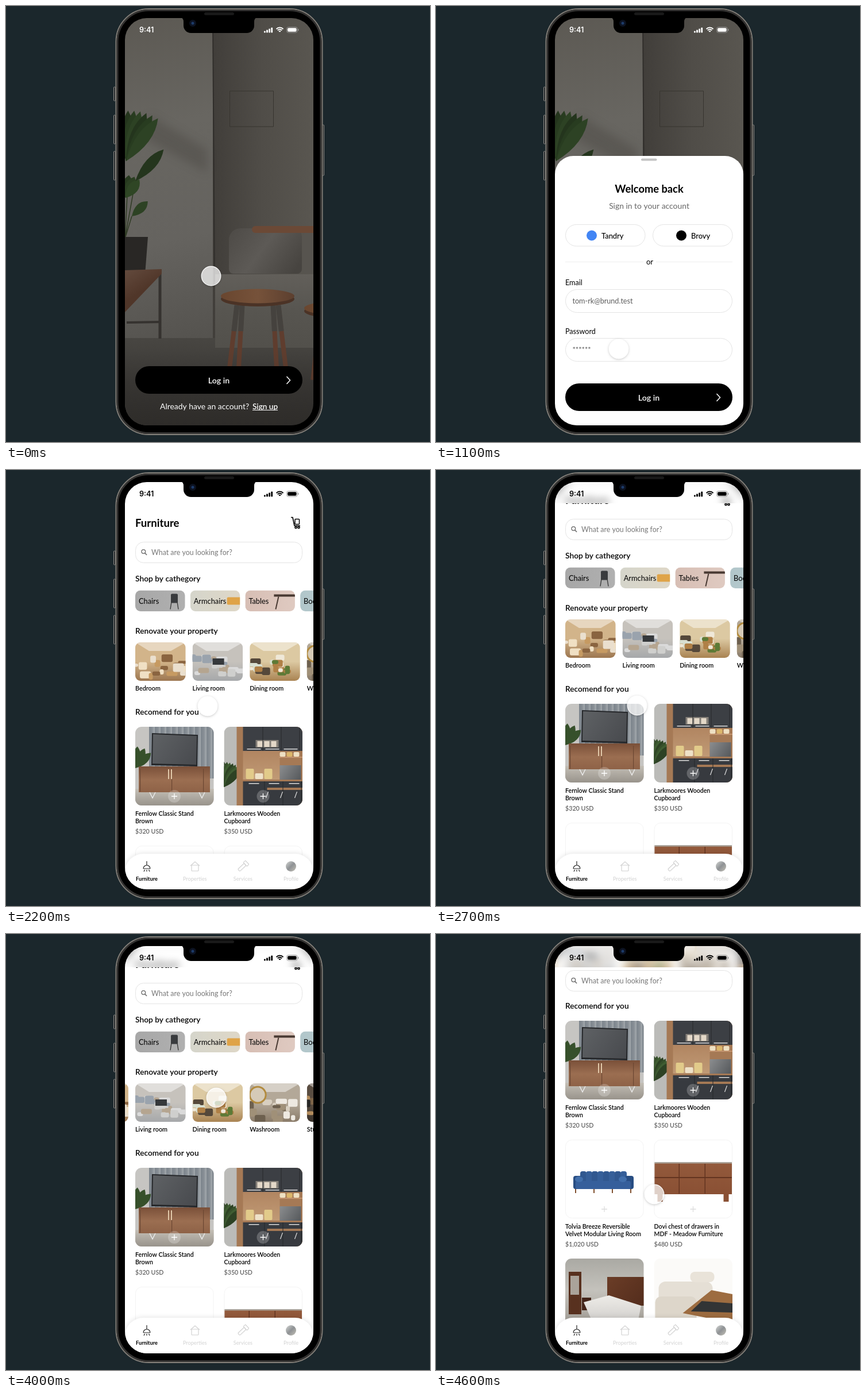
Write an HTML page with a canvas that moves like this. It is 738 px wide and 759 px high and loops after 4.7 s.

```html
<!DOCTYPE html>
<html lang="en">
<head>
<meta charset="utf-8">
<title>Furniture app</title>
<style>
html, body { margin: 0; width: 100%; height: 100%; overflow: hidden; background: #1b272c; }
canvas { display: block; }
</style>
</head>
<body>
<canvas id="stage" width="738" height="759"></canvas>
<script>
const canvas = document.getElementById('stage');
const c = canvas.getContext('2d');
const LOOP = 4700, STEP = 100;

// Motion
const clamp = v => Math.max(0, Math.min(1, v));
const part = (t, from, to) => clamp((t - from) / (to - from));
const slide = (t, from, to) => { const p = part(t, from, to); return p * p * (3 - 2 * p); };

const scrollAt = t => 40 * slide(t, 2300, 2600) + 256 * slide(t, 4100, 4500);
const chipsAt = t => 70 * Math.sin(Math.PI * part(t, 3000, 3600));
const roomsAt = t => 99.6 * slide(t, 3600, 4000);

// Each move: start, end, destination
const MOVES = [
  [0, 200, 352, 650], [400, 600, 336, 512], [900, 1000, 318, 597], [1200, 1400, 317, 675],
  [1800, 2100, 351, 411], [2300, 2400, 351, 450], [2400, 2600, 350, 410], [2700, 3000, 400, 190],
  [3400, 3600, 430, 286], [3600, 4000, 366, 285], [4000, 4100, 380, 610], [4100, 4500, 380, 453]];
function pointerAt(t) {
  let x = 357, y = 470;
  for (const [from, to, px, py] of MOVES) {
    const k = slide(t, from, to);
    x += (px - x) * k; y += (py - y) * k;
  }
  return [x - chipsAt(t), y];
}

// Drawing helpers
function grad(x0, y0, x1, y1, ...colors) {
  const g = c.createLinearGradient(x0, y0, x1, y1);
  colors.forEach((col, i) => g.addColorStop(i / (colors.length - 1), col));
  return g;
}
function rect(col, x, y, w, h) { c.fillStyle = col; c.fillRect(x, y, w, h); }
function round(x, y, w, h, r, fill, stroke, lw = 1) {
  c.beginPath(); c.roundRect(x, y, w, h, r);
  if (fill) { c.fillStyle = fill; c.fill(); }
  if (stroke) { c.strokeStyle = stroke; c.lineWidth = lw; c.stroke(); }
}
function oval(col, x, y, rx, ry = rx) {
  c.beginPath(); c.ellipse(x, y, rx, ry, 0, 0, 7); c.fillStyle = col; c.fill();
}
function arc(col, w, x, y, r, from = 0, to = 7) {
  c.beginPath(); c.arc(x, y, r, from, to);
  c.strokeStyle = col; c.lineWidth = w; c.stroke();
}
function trace(p) {
  c.beginPath();
  for (let i = 0; i < p.length; i += 2) c.lineTo(p[i], p[i + 1]);
}
function poly(col, ...p) { trace(p); c.fillStyle = col; c.fill(); }
function line(col, w, ...p) { trace(p); c.strokeStyle = col; c.lineWidth = w; c.stroke(); }
function text(s, x, y, size, col = '#000', weight = 400, align = 'left', face = 'Lato') {
  c.font = `${weight} ${size}px ${face}, sans-serif`;
  c.textAlign = align; c.fillStyle = col;
  c.fillText(s, x, y + size * 0.35);
}
function clipped(x, y, w, h, r, draw) {
  c.save();
  c.beginPath(); c.roundRect(x, y, w, h, r); c.clip();
  c.translate(x, y); draw();
  c.restore();
}
function repeat(n, draw) { for (let i = 0; i < n; i++) draw(i); }
const random = seed => () => (seed = seed * 16807 % 2147483647) / 2147483647;

function phone() {
  rect('#1b272c', 0, 0, 738, 759);
  repeat(3, i => round(187.5, [141, 190, 253][i], 3, i ? 50 : 24, 1, '#24282a', '#8b8985'));
  round(550.5, 207, 3, 88, 1, '#24282a', '#8b8985');
  round(191.5, 5, 359, 741, 57, '#000', '#85817b', 2);
  round(194, 7.5, 354, 736, 54, null, '#343332', 3);
  round(345, 11, 52, 5, 2.5, '#191919');
}

function notch() {
  round(309, 18, 123, 29, [0, 0, 13, 13], '#000');
  for (const [x, side] of [[309, -1], [432, 1]]) {
    c.beginPath(); c.moveTo(x + 6 * side, 20);
    c.quadraticCurveTo(x, 20, x, 28); c.lineTo(x, 20); c.fill();
  }
  oval('#0c1220', 325, 30, 6);
  oval('#1c3a68', 325, 30, 2.5);
}

function statusBar(col) {
  text('9:41', 232, 41.5, 12.6, col, 600, 'left', 'Inter');
  repeat(4, i => round(449 + i * 4.1, 43.5 - i * 2, 2.8, 3 + i * 2, 1, col));
  repeat(3, i => arc(col, 2, 476.5, 46, 2 + i * 3.2, -2.36, -.78));
  round(488.5, 36.7, 18.6, 9.6, 3, null, '#999', .9);
  round(490, 38.2, 15.6, 6.6, 2, col);
  rect('#999', 508, 39.8, 1.3, 3.4);
}

function button(y, label) {
  round(225, y, 291, 48, 24, '#000');
  if (!label) return;
  text(label, 370.5, y + 25, 14.2, '#fff', 600, 'center');
  line('#fff', 1.5, 488.5, y + 18, 494.5, y + 24.5, 488.5, y + 31);
}

function leaf(x, y, len, width, turn, light) {
  c.save();
  c.translate(x, y); c.rotate(turn);
  c.beginPath(); c.moveTo(0, 0);
  c.quadraticCurveTo(width, -len * .6, 0, -len);
  c.quadraticCurveTo(-width, -len * .6, 0, 0);
  c.fillStyle = `hsl(102, 30%, ${light}%)`; c.fill();
  c.restore();
}

function plant() {
  for (const [x, y] of [[225, 305], [219, 366], [211, 330]]) line('#2f3b24', 1.5, 207, 405, x, y);
  repeat(6, i => leaf(209, 270, 88 + i, 22, .04 + i * .12, 16 + i % 3 * 2));
  repeat(3, i => leaf(208, 334, 40, 18, .15 + i * .25, 17 + i * 2));
  leaf(225, 305, 74, 19, .73, 16);
  leaf(219, 366, 38, 16, .82, 20);
  poly('#292725', 207, 402, 247, 402, 242, 467, 207, 469);
}

function stool(x, y) {
  for (const side of [-1, 1]) repeat(2, back => {
    const top = x + side * (36 - back * 9), foot = x + side * (49 - back * 16);
    line('#5f3d2e', 8, top, y + 16, foot, y + 125);
    line('#45423e', 9, top, y + 16, top + (foot - top) * .4, y + 61);
  });
  oval('#4b3326', x, y + 5, 64, 13);
  oval(grad(x - 64, 0, x + 64, 0, '#69462f', '#76523a', '#5c3f2f'), x, y, 64, 12.5);
}

function splash() {
  rect(grad(207, 20, 330, 600, '#5c5953', '#686661', '#65635f', '#53514d'), 207, 20, 154, 710);
  rect(grad(360, 0, 535, 0, '#413e3a', '#504d48', '#595650'), 360, 20, 175, 580);
  c.filter = 'blur(8px)';
  poly('rgba(45,43,40,.22)', 250, 190, 350, 250, 350, 290, 240, 230);
  c.filter = 'none';
  line('#302e2b', 2, 360, 20, 363, 480);
  round(389.5, 148, 76, 62, 0, null, '#37342f');
  // floor, bench, cushion and table
  rect(grad(0, 578, 0, 730, '#484642', '#3b3936', '#33312e'), 207, 578, 328, 152);
  rect(grad(0, 467, 0, 595, '#625f5a', '#575550', '#52504b'), 364, 467, 171, 128);
  round(517, 395, 30, 71, 4, '#57544f');
  round(388, 387, 127, 79, [20, 14, 8, 8], grad(390, 385, 500, 465, '#4d4a46', '#5d5a56', '#474440'));
  round(428, 383, 120, 12, 6, '#6b4936');
  stool(438, 505);
  stool(583, 526);
  plant();
  line('#35322f', 5, 268, 460, 268, 579);
  line('#35322f', 4, 210, 551, 268, 550);
  poly(grad(207, 465, 230, 500, '#61483b', '#503629'), 207, 460, 271, 458, 271, 466, 207, 533);
  rect(grad(0, 600, 0, 730, 'rgba(40,38,36,0)', 'rgba(40,38,36,.45)'), 207, 600, 328, 130);
  button(627, 'Log in');
  text('Already have an account?', 268, 697, 13.9, '#fff');
  text('Sign up', 429, 697, 13.6, '#fff', 600);
  rect('#fff', 429, 703, 44, 1);
}

function spinner(t) {
  c.save();
  c.translate(370.5, 681); c.rotate(t / 300);
  repeat(12, i => {
    c.rotate(Math.PI / 6);
    line('#fff', 2.4, 8, 0, i % 2 ? 10 : 12.5, 0);
  });
  c.restore();
}

function field(label, y, value, hint) {
  text(label, 225, y, 12.6);
  round(225.5, y + 11.5, 290, 40, 20, '#fff', '#e4e4e4');
  text(value || hint, 237.5, y + 32, 12.6, value ? '#5c5c5c' : '#b2b2b2');
}

function provider(x, name, nameX, col) {
  round(x, 380.5, 138.5, 37.5, 19, '#fff', '#e4e4e4');
  oval(col, nameX - 17, 399.5, 9);
  text(name, nameX, 400, 12.9, '#000', 500);
}

function signIn(t) {
  const typed = (s, start) => s.slice(0, Math.floor(s.length * part(t, start, start + 300)));
  const busy = t >= 1500;
  c.save();
  c.translate(0, 469 * (1 - slide(t, 200, 400)));
  round(207, 261, 328, 480, [32, 32, 0, 0], '#fff');
  round(357, 265.5, 27.5, 4, 2, '#c3c3c3');
  text('Welcome back', 371, 319, 18.3, '#000', 700, 'center');
  text('Sign in to your account', 371, 348, 13.9, '#666', 400, 'center');
  provider(225.5, 'Tandry', 288, '#4285f4');
  provider(377.5, 'Brovy', 444, '#000');
  rect('#eee', 225, 445, 291, 1);
  rect('#fff', 361, 440, 22, 10);
  text('or', 372, 445, 13, '#000', 400, 'center');
  field('Email', 482, typed('tom-rk@brund.test', 600), 'writer@brund.test');
  field('Password', 567, typed('**********', 900), '********');
  button(657, busy ? '' : 'Log in');
  if (busy) spinner(t);
  c.restore();
}

const chips = [
  ['Chairs', '#a7a7a7', '#b0b0b0', () => {
    round(62, 6, 12, 16, 2, '#393b3e');
    for (const side of [-1, 1]) line('#333', 1.3, 68 + side * 5, 20, 68 + side * 7, 33);
  }],
  ['Armchairs', '#d5d5cb', '#ded7c7', () => round(64, 12, 30, 13, 2, '#dfa348')],
  ['Tables', '#d7beb4', '#dfcac1', () => {
    rect('#493a33', 50, 7, 37, 4);
    line('#493a33', 2, 58, 11, 53, 33);
  }],
  ['Bookcases', '#b1c6ca', '#bccdd0', () => rect('#8b6d52', 69, 6, 13, 26)]
];

// Soft room: shaded wall, pale ceiling, scattered pieces in the given tones
function room(seed, wall, floor, ...tones) {
  const r = random(seed);
  rect(grad(0, 0, 0, 67, wall, wall, floor), 0, 0, 88, 67);
  poly('rgba(255,255,255,.45)', 0, 0, 88, 0, 62, 15, 24, 15);
  repeat(18, i => round(r() * 84 - 6, 20 + r() * 38, 7 + r() * 13, 5 + r() * 10, 3, tones[i % tones.length]));
}

const rooms = [
  ['Bedroom', () => room(11, '#d2b48a', '#9c7650', '#eadfce', '#8a6440', '#c69a62', '#f0e0c4')],
  ['Living room', () => {
    room(23, '#c6c2bc', '#a6a8aa', '#9aa3ad', '#cfcfcd', '#b5a590', '#dadada');
    rect('#35383b', 35, 28, 20, 11);
  }],
  ['Dining room', () => room(35, '#dcc9a2', '#a98352', '#efe8d8', '#5d7a36', '#b08046', '#55483a', '#d8dfd0')],
  ['Washroom', () => {
    room(47, '#b3a898', '#8a7b69', '#d8cfc0', '#6d604f', '#eee9e1', '#a09078');
    oval('#d5cab7', 14, 20, 13);
    arc('#b28b3f', 3, 14, 20, 14);
  }],
  ['Study', () => room(59, '#5a4d41', '#3b332c', '#b28b5c', '#282726', '#7d6448')]
];

function tvStand() {
  rect('#c6c5c2', 0, 0, 137, 137);
  repeat(12, i => rect(grad(24 + i * 10, 0, 34 + i * 10, 0, '#7d858d', '#868d94', '#a4aaae'), 24 + i * 10, 0, 10, 90));
  repeat(3, i => leaf(0, 72, 38, 14, .1 + i * .35, 24));
  rect(grad(0, 108, 0, 137, '#c4bfb6', '#98938b'), 0, 108, 137, 29);
  poly('#25272a', 29, 11, 109, 14, 108, 69, 28, 67);
  poly(grad(29, 12, 108, 68, '#5f6265', '#47494d'), 31, 13, 107, 16, 106, 66, 30, 64);
  rect(grad(0, 69, 0, 116, '#7a5039', '#9b6e51', '#8d6146'), 6, 69, 124, 45);
  repeat(3, i => rect('#6c4732', 8 + i * 55, 73, 1.2, 40));
  repeat(2, i => rect('#e2c9aa', 57 + i * 5, 74, 2, 17));
  for (const x of [30, 116]) line('#eee', 1.3, x - 5, 114, x, 124, x + 5, 114);
}

function cupboard() {
  rect('#bbbbb8', 0, 0, 137, 137);
  repeat(7, i => leaf(0, 105, 44, 13, i * .12, 20 + i % 3 * 4));
  rect('#a57955', 22, 0, 115, 137);
  rect('#3c3f44', 33, 0, 104, 42);
  rect(grad(33, 42, 33, 92, '#b18561', '#c09a75'), 33, 42, 64, 50);
  rect('#847f78', 55, 23, 40, 13);
  rect('#c49570', 96, 52, 41, 2);
  rect(grad(97, 67, 134, 92, '#8b8d8f', '#55585b'), 97, 67, 37, 25);
  repeat(3, i => {
    rect('#e3d8c8', 58 + i * 12, 25, 9, 10);
    round(38 + i * 16, 73 + i % 2 * 8, 14, 18 - i % 2 * 8, 2, i % 2 ? '#eee2c8' : '#e2cb8a');
    round(97 + i * 12, 44, 10, 8, 2, i % 2 ? '#dbb66b' : '#eee0c2');
  });
  rect('#373a3f', 33, 95, 104, 42);
  rect('#a57955', 75, 106, 62, 4);
  repeat(3, i => {
    rect('#26282b', 67 + i * 32, 0, 1, 42);
    rect('#26282b', 70 + i * 32, 95, 1, 42);
    rect('#ddd', 40 + i * 32, 38, 24, 1.5);
    rect('#ddd', 43 + i * 35, 98, 18, 1.5);
    line('#ddd', 1.2, 77 + i * 25, 113, 73 + i * 25, 124);
  });
}

function sofa() {
  rect('#fff', 0, 0, 137, 137);
  repeat(8, i => round(26 + i * 10, 55, 11, 24, 4, i % 2 ? '#365f99' : '#315890'));
  for (const x of [14, 104]) round(x, 63, 15, 23, 4, '#284d82');
  round(18, 72, 96, 14, 3, '#365f9b');
  for (const x of [24, 100]) oval('#426fab', x, 69, 7, 5);
  repeat(4, i => line('#80502f', 2, 18 + i * 32, 86, 18 + i * 32, 93));
}

function drawers() {
  rect('#fff', 0, 0, 137, 137);
  for (const x of [6, 121]) rect('#8a5034', x, 94, 9, 14);
  rect(grad(0, 40, 0, 95, '#935a3c', '#8a5034'), 0, 40, 137, 55);
  rect('#aaa39a', 0, 39, 137, 2.5);
  for (const x of [43, 88]) rect('#633420', x, 42, 1.5, 52);
  rect('#633420', 0, 65, 137, 2);
}

function bed() {
  rect(grad(0, 0, 0, 110, '#aaa9a3', '#c4c2bc', '#a5a098'), 0, 0, 137, 137);
  rect('#58311f', 6, 23, 22, 74);
  rect('#aaa39a', 9, 30, 15, 33);
  rect('#432419', 29, 68, 16, 22);
  rect(grad(73, 32, 137, 92, '#6b3d27', '#512b1b'), 73, 32, 64, 50);
  poly(grad(0, 64, 0, 112, '#eeece8', '#cfcdca'), 32, 76, 76, 64, 132, 82, 126, 112, 48, 112);
}

function recliner() {
  rect('#fbfaf8', 0, 0, 137, 137);
  round(8, 40, 94, 46, 12, '#e5dfd5');
  round(63, 23, 42, 18, 8, '#e9e3d9');
  round(2, 66, 72, 55, 10, '#ddd6ca');
  poly('#9d6c40', 100, 55, 137, 62, 137, 112, 50, 95);
  poly('#323435', 83, 74, 137, 78, 137, 94, 64, 92);
}

const products = [
  [tvStand, 'Fernlow Classic Stand', 'Brown', '$320 USD'],
  [cupboard, 'Larkmoores Wooden', 'Cupboard', '$350 USD'],
  [sofa, 'Tolvia Breeze Reversible', 'Velvet Modular Living Room', '$1,020 USD'],
  [drawers, 'Dovi chest of drawers in', 'MDF - Meadow Furniture', '$480 USD'],
  [bed, '', '', ''],
  [recliner, '', '', '']
];

function product([art, name, more, price], i) {
  const x = i % 2 ? 379.5 : 225, row = i >> 1, y = 447 + row * 207;
  const ink = row === 1 ? '#ddd' : '#fff';
  clipped(x, y, 136.5, 137, 11, art);
  if (row === 1) round(x + .5, y + .5, 135.5, 136, 11, null, '#f3f3f3');
  oval('rgba(255,255,255,.22)', x + 68, y + 121, 11);
  line(ink, 1.3, x + 63, y + 121, x + 73, y + 121);
  line(ink, 1.3, x + 68, y + 116, x + 68, y + 126);
  text(name, x, y + 151, 10.6, '#000', 600);
  text(more, x, y + 164, 10.6, '#000', 600);
  text(price, x, y + 182.5, 10.7, '#555', 500);
}

function cart() {
  line('#000', 1.7, 496, 82.5, 499, 82.5, 502, 97, 512, 97);
  round(503, 85.5, 7.5, 9, 1, null, '#000', 1.5);
  repeat(2, i => arc('#000', 1.6, 504.5 + i * 5, 100, 1.6));
}

function search(y) {
  round(225.5, y + .5, 290, 36, 14, '#fff', '#e4e4e4');
  arc('#666', 1.3, 239.3, y + 17, 3.3);
  line('#666', 1.5, 241.8, y + 19.5, 245, y + 23);
  text('What are you looking for?', 253, y + 18.8, 12.4, '#777');
}

function tabBar() {
  c.save();
  c.shadowColor = 'rgba(0,0,0,.13)'; c.shadowBlur = 10;
  round(207, 668, 328, 80, [32, 32, 0, 0], '#fff');
  c.restore();
  // lamp, house, hammer, portrait
  line('#222', 1.2, 245, 681, 245, 688);
  arc('#222', 1.2, 245, 694, 6, Math.PI, 0);
  line('#222', 1.2, 239, 694, 251, 694);
  repeat(3, i => line('#222', 1.2, 241.5 + i * 3.5, 696, 240 + i * 5, 699));
  line('#d2d2d2', 1.2, 321, 689, 329, 682, 337, 689);
  round(323, 688, 12, 10, 1, null, '#d2d2d2', 1.2);
  c.save();
  c.translate(412.5, 690); c.rotate(-.75);
  round(-10, -2.5, 15, 5, 1.5, null, '#d2d2d2', 1.2);
  round(5, -4.5, 5, 9, 1, null, '#d2d2d2', 1.2);
  c.restore();
  oval(grad(487, 681, 505, 699, '#d5d8d5', '#8f9295', '#c3c0b6'), 496, 690, 9);
  ['Furniture', 'Properties', 'Services', 'Profile'].forEach((s, i) =>
    text(s, 245 + i * 83.7, 711.5, 9.2, i ? '#d2d2d2' : '#000', i ? 400 : 700, 'center'));
}

// Blurred content behind the status bar
function frost() {
  c.save();
  c.beginPath(); c.rect(207, 20, 328, 38); c.clip();
  c.filter = 'blur(7px)';
  c.drawImage(canvas, 207, 20, 328, 52, 207, 20, 328, 52);
  c.filter = 'none';
  rect(grad(0, 20, 0, 58, 'rgba(255,255,255,.7)', 'rgba(255,255,255,.35)'), 207, 20, 328, 38);
  c.restore();
}

function home(t) {
  const scroll = scrollAt(t);
  rect('#fff', 207, 20, 328, 711);
  c.globalAlpha = slide(t, 1700, 2100);
  c.save();
  c.translate(0, -scroll);
  text('Furniture', 225, 92, 18.6, '#000', 700);
  cart();
  text('Shop by cathegory', 225, 189.5, 13.8, '#000', 600);
  chips.forEach(([name, from, to, art], i) => clipped(225 + i * 95.7 - chipsAt(t), 209.5, 86.5, 36.5, 9, () => {
    rect(grad(0, 0, 87, 0, from, to), 0, 0, 87, 37);
    art();
    text(name, 6, 19, 12.8);
  }));
  text('Renovate your property', 225, 280, 13.7, '#000', 600);
  rooms.forEach(([name, art], i) => {
    const x = 225 + i * 99.6 - roomsAt(t);
    clipped(x, 300, 87.5, 67, 9, art);
    text(name, x, 380, 10.8, '#000', 600);
  });
  text('Recomend for you', 225, 421, 13.7, '#000', 600);
  products.forEach(product);
  c.restore();
  if (scroll > 0) frost();
  if (scroll > 62) rect('#fff', 207, 58, 328, 50);
  search(Math.max(125 - scroll, 63));
  tabBar();
  c.globalAlpha = 1;
}

function pointer(t) {
  const [x, y] = pointerAt(t);
  // the shadow falls only outside the disc
  c.save();
  c.beginPath(); c.rect(0, 0, 738, 759); c.arc(x, y, 17, 0, 7); c.clip('evenodd');
  c.shadowColor = 'rgba(0,0,0,.25)'; c.shadowBlur = 4; c.shadowOffsetY = 1;
  oval('#fff', x, y, 17);
  c.restore();
  oval('rgba(255,255,255,.73)', x, y, 17);
  arc('rgba(255,255,255,.8)', 1.4, x, y, 16.8);
}

function draw(t) {
  const inside = t >= 1800;
  phone();
  c.save();
  c.beginPath(); c.roundRect(207, 21, 328, 709, 38); c.clip();
  if (inside) home(t);
  else {
    splash();
    if (t > 200) signIn(t);
  }
  statusBar(inside ? '#000' : '#fff');
  pointer(t);
  c.restore();
  notch();
}

// The picture advances in even steps
let shown = -1;
function tick() {
  const t = Math.floor(performance.now() % LOOP / STEP) * STEP;
  if (t !== shown) draw(shown = t);
  requestAnimationFrame(tick);
}
tick();
</script>
</body>
</html>
```
